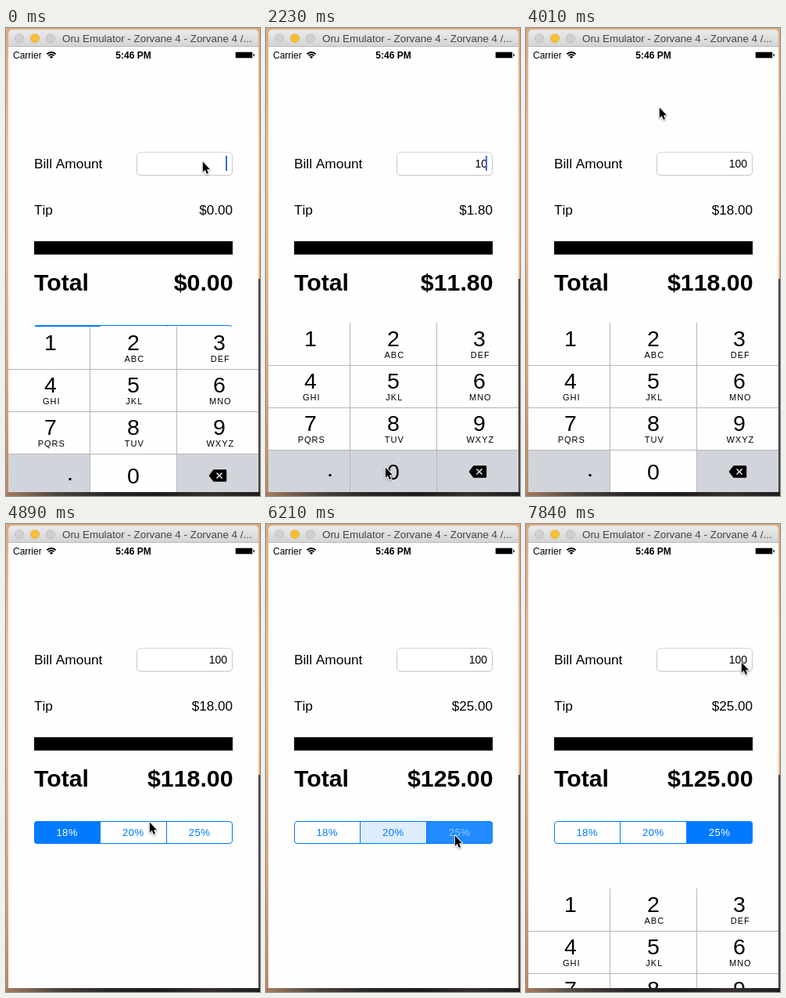
Recreate the animation shown at these times as an HTML page with a canvas. Size 325 by 597 pixels, loop 7.99 s.

```html
<!DOCTYPE html>
<html lang="en">
<head>
<meta charset="utf-8">
<title>Tip calculator</title>
<style>
  html, body { margin: 0; width: 100%; height: 100%; overflow: hidden; background: #fff; }
  canvas { display: block; width: 325px; height: 597px; }
</style>
</head>
<body>
<canvas id="stage" width="325" height="597"></canvas>
<script>
const ctx = document.getElementById('stage').getContext('2d');
const LOOP = 7990, BEATS = 54;
const SANS = '"Liberation Sans", Arial, sans-serif';
const BLUE = '#007aff', KEY_GRAY = '#d1d5db', LINE = '#b5b5b8';
const PAD_TOP = 376, PAD_HEIGHT = 216, ROW = 54;

// The story, in beats: typed keys, focusing the field, picking a tip.
const taps = [{ beat: 10, key: '1' }, { beat: 13, key: '0' }, { beat: 15, key: '0' }];
const BLUR = 29, FOCUS = 48;
const options = [
  { rate: 0.18, pick: -9 },
  { rate: 0.20, pick: 35 },
  { rate: 0.25, pick: 41 }
];
const moves = [
  { from: 4, to: 8.7, x: 59, y: 397 },
  { from: 10, to: 12.4, x: 152, y: 560 },
  { from: 21, to: 24, x: 170, y: 153 },
  { from: 25, to: 27, x: 170, y: 101 },
  { from: 29, to: 33, x: 183, y: 380 },
  { from: 33, to: 35, x: 158, y: 397 },
  { from: 37, to: 41, x: 241, y: 397 },
  { from: 42, to: 44.5, x: 275, y: 176 }
];

const clamp = v => Math.min(1, Math.max(0, v));
const ease = v => { const k = clamp(v); return k * k * (3 - 2 * k); };

function pointerAt(beat) {
  let x = 251, y = 170;
  for (const m of moves) {
    const k = ease((beat - m.from) / (m.to - m.from));
    x += (m.x - x) * k;
    y += (m.y - y) * k;
  }
  return [x, y];
}

function caretAt(beat) {
  if (beat >= BLUR && beat < FOCUS) return 0;
  const resets = [-2, ...taps.map(t => t.beat), FOCUS - 1];
  const phase = beat - 2 - resets.findLast(b => beat > b);
  return clamp(0.5 + 1.2 * Math.cos(phase / 7 * 2 * Math.PI));
}

// How far the keypad is pushed below its resting place.
function dropAt(beat) {
  const slide = start => ease((beat - start) / 3.22);
  return Math.round(PAD_HEIGHT * (1 - slide(-2.93) + slide(28.3) - slide(51.2)));
}

// How strongly option i is filled: fades in on its pick, out on the next.
function fillAt(i, beat) {
  const picked = o => o ? ease((beat - o.pick + 0.55) / 2) : 0;
  return picked(options[i]) * (1 - picked(options[i + 1]));
}

function rect(x, y, w, h, color) {
  ctx.fillStyle = color;
  ctx.fillRect(x, y, w, h);
}

function pill(x, y, w, h, r) {
  ctx.beginPath();
  ctx.roundRect(x, y, w, h, r);
}

function shape(...points) {
  ctx.beginPath();
  points.forEach(([x, y]) => ctx.lineTo(x, y));
  ctx.closePath();
}

function stroke(color, width) {
  ctx.strokeStyle = color;
  ctx.lineWidth = width;
  ctx.stroke();
}

function fill(color) {
  ctx.fillStyle = color;
  ctx.fill();
}

function text(str, x, y, size, { bold, kern, align = 'left', gap = 0, color = '#000' } = {}) {
  ctx.font = `${bold ? 'bold ' : ''}${size}px ${SANS}`;
  ctx.textAlign = align;
  ctx.letterSpacing = gap + 'px';
  ctx.fontKerning = kern ? 'normal' : 'none';
  ctx.fillStyle = color;
  ctx.fillText(str, x, y);
}

function gradient(x0, y0, x1, y1, ...colors) {
  const g = ctx.createLinearGradient(x0, y0, x1, y1);
  colors.forEach((c, i) => g.addColorStop(i / (colors.length - 1), c));
  return g;
}

function drawWindow() {
  rect(0, 0, 325, 597, gradient(0, 0, 0, 597, '#dcab7e', '#eebe90', '#ecb98a', '#dca678', '#b98860'));
  rect(323, 320, 2, 277, '#454240');
  rect(0, 592, 325, 5, gradient(0, 0, 325, 0, '#a87c5e', '#4b4540', '#2a2624', '#1d1a19', '#35302d', '#1f1d1c'));

  pill(3, 2, 320, 30, 5);
  fill(gradient(0, 2, 0, 24, '#ebebeb', '#d3d3d3'));
  rect(3, 23, 320, 1, '#b9b9b9');
  rect(3, 24, 320, 568, '#fefefe');

  ['#d0d0d0', '#fdbd2e', '#d0d0d0'].forEach((color, i) => {
    ctx.beginPath();
    ctx.arc(17 + 20 * i, 13, 5.6, 0, 7);
    fill(color);
    stroke('rgba(0,0,0,0.13)', 0.8);
  });
  text('Oru Emulator - Zorvane 4 - Zorvane 4 /...', 72, 18, 13.4, { color: '#444' });
}

function drawStatus() {
  text('Carrier', 9, 38.5, 12);
  text('5:46 PM', 163, 38.5, 12, { bold: true, align: 'center' });

  for (const r of [1.5, 5, 8]) {
    ctx.beginPath();
    ctx.arc(58, 39, r, -Math.PI * 0.75, -Math.PI * 0.25);
    stroke('#000', r < 2 ? 3 : 1.8);
  }

  pill(293.5, 30.5, 22.5, 8, 1.5);
  stroke('rgba(0,0,0,0.35)', 0.8);
  rect(294, 31, 21, 7, '#000');
  rect(316.5, 33, 1.2, 3, '#000');
}

function drawForm(beat) {
  const amount = taps.filter(t => beat > t.beat).map(t => t.key).join('');
  const tip = amount * options.findLast(o => beat > o.pick).rate;
  const money = n => '$' + n.toFixed(2);

  text('Bill Amount', 36, 179, 17.3);
  pill(167.5, 158.5, 122, 29.5, 4.5);
  fill('#fff');
  stroke(gradient(0, 158, 0, 188, '#d4d4d4', '#bcbcbc'), 1);
  text(amount, 283, 178, 14, { align: 'right' });
  rect(281, 163, 2, 19, `rgba(63,102,224,${caretAt(beat)})`);

  text('Tip', 36, 238, 17.2);
  text(money(tip), 290, 238, 17.1, { align: 'right' });
  rect(36, 272, 254, 17, '#000');
  text('Total', 36, 335.4, 30.2, { bold: true, kern: true });
  text(money(+amount + tip), 290.5, 335.4, 30.3, { bold: true, align: 'right' });
}

function drawSegments(beat) {
  const cell = 254 / 3;
  ctx.save();
  pill(36, 379, 254, 29, 4);
  ctx.clip();
  options.forEach(({ rate }, i) => {
    const x = 36 + i * cell, level = fillAt(i, beat), mix = level ** 4;
    rect(x, 379, cell, 29, `rgba(0,122,255,${level})`);
    if (i) rect(Math.floor(x), 379, 1, 29, BLUE);
    text(Math.round(rate * 100) + '%', x + cell / 2 - 0.2, 398, 13.1, {
      align: 'center', gap: 0.4,
      color: `rgb(${255 * mix},${122 + 133 * mix},255)`
    });
  });
  ctx.restore();
  pill(36.5, 379.5, 253, 28, 3.5);
  stroke(BLUE, 1);
}

function drawDelete(x, y) {
  ctx.lineJoin = 'round';
  shape([x - 10, y], [x - 5, y - 6.5], [x + 10, y - 6.5], [x + 10, y + 6.5], [x - 5, y + 6.5]);
  fill('#000');
  stroke('#000', 2.4);
  ctx.beginPath();
  for (const s of [-1, 1]) {
    ctx.moveTo(x - 1.5, y - 3.5 * s);
    ctx.lineTo(x + 5.5, y + 3.5 * s);
  }
  stroke('#fff', 1.4);
}

function drawKeypad(beat) {
  const drop = dropAt(beat);
  if (drop >= PAD_HEIGHT) return;
  const down = taps.find(t => t.beat === beat)?.key;
  const edges = [3, 108, 219, 323];
  const letters = ['', 'ABC', 'DEF', 'GHI', 'JKL', 'MNO', 'PQRS', 'TUV', 'WXYZ'];

  ctx.save();
  ctx.beginPath();
  ctx.rect(3, PAD_TOP, 320, PAD_HEIGHT);
  ctx.clip();
  ctx.translate(0, PAD_TOP + drop);
  rect(3, 0, 320, PAD_HEIGHT, '#fefefe');

  [...'123456789 0 '].forEach((digit, i) => {
    const col = i % 3, y = Math.floor(i / 3) * ROW;
    const x = 57 + 108 * col - (col === 1 ? 2 : 0);
    if (digit === ' ' || digit === down) rect(edges[col], y, edges[col + 1] - edges[col], ROW, KEY_GRAY);
    text(digit, x, y + (i < 9 ? 30 : 37.5), 28.5, { align: 'center' });
    if (letters[i]) text(letters[i], x + 1.3, y + 45, 11, { align: 'center', gap: 1 });
  });
  for (let row = 1; row < 4; row++) rect(3, row * ROW, 320, 1, LINE);
  for (const x of edges.slice(1, 3)) rect(x - 1, 0, 1, PAD_HEIGHT, LINE);

  rect(80.5, 193, 3, 3, '#000');
  drawDelete(271, 190);
  ctx.restore();
}

function drawPointer(beat) {
  ctx.save();
  ctx.translate(...pointerAt(beat));
  ctx.translate(0.8, 0.6);
  shape([0, 0], [0, 13.2], [3, 10.5], [5.1, 15.4], [7.2, 14.5], [5.2, 9.7], [9.2, 9.7]);
  ctx.lineJoin = 'round';
  ctx.shadowColor = 'rgba(0,0,0,0.35)';
  ctx.shadowBlur = 2;
  ctx.shadowOffsetY = 1;
  stroke('#fff', 2);
  ctx.shadowColor = 'transparent';
  fill('#000');
  ctx.restore();
}

function draw(now) {
  // The picture advances in even beats and is held between them.
  const beat = Math.min(BEATS - 1, Math.floor((now % LOOP) / LOOP * BEATS + 0.04));
  drawWindow();
  drawStatus();
  drawForm(beat);
  drawSegments(beat);
  drawKeypad(beat);
  drawPointer(beat);
}

let start;
function tick(now) {
  start ??= now;
  draw(now - start);
  requestAnimationFrame(tick);
}
draw(0);
requestAnimationFrame(tick);
</script>
</body>
</html>
```
